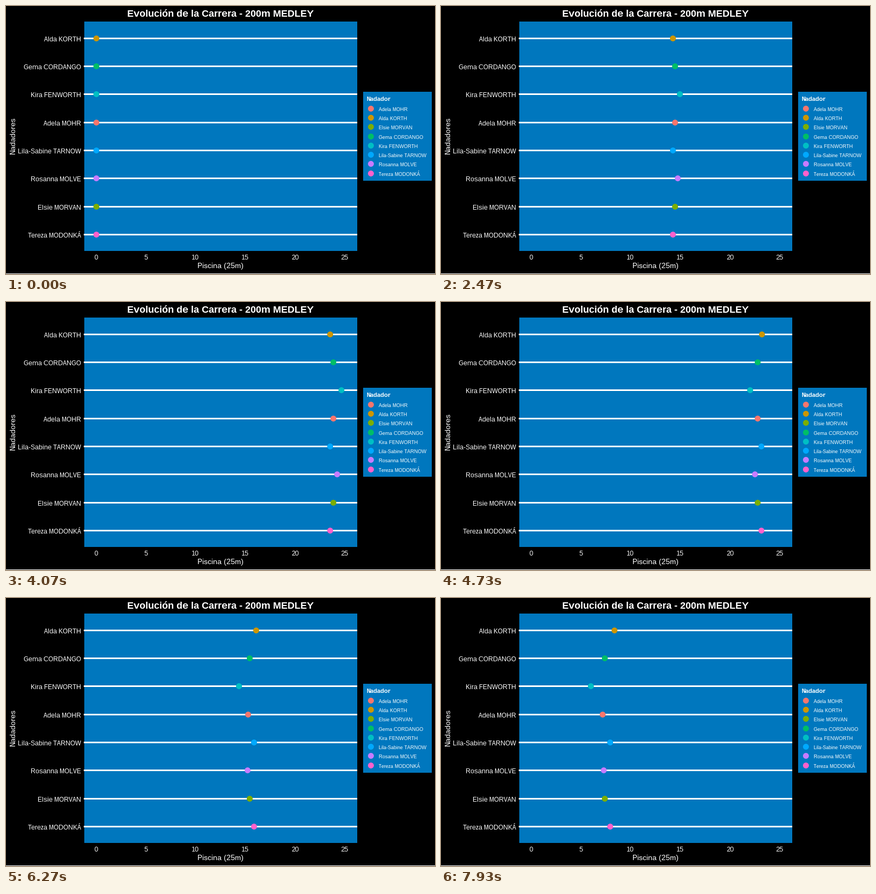
A matplotlib script that plays this animation: 800 px wide and 500 px high, repeating every 8 s.

```python
import math

import matplotlib.pyplot as plt
from matplotlib.animation import FuncAnimation
from matplotlib.patches import Circle, Rectangle

W, H = 800, 500
LOOP_MS, TICK_MS = 8000, 20
POOL = "#0077BE"
LEFT, RIGHT = 168.5, 632.6  # x of 0 m and 25 m
RADIUS = 5.5

# name, colour, steps for the first and second length, in lane order
SWIMMERS = [
    ("Alda KORTH", "#CD9600", 65, 81),
    ("Gema CORDANGO", "#00BE67", 64, 78),
    ("Kira FENWORTH", "#00BFC4", 62, 75),
    ("Adela MOHR", "#F8766D", 64, 77),
    ("Lila-Sabine TARNOW", "#00A9FF", 65, 79),
    ("Rosanna MOLVE", "#C77CFF", 63, 79),
    ("Elsie MORVAN", "#7CAE00", 64, 78),
    ("Tereza MODONKÁ", "#FF61CC", 65, 79),
]

# Fully hinted glyphs on whole pixels
plt.rcParams.update({
    "font.family": "Liberation Sans",
    "text.hinting": "default",
    "text.hinting_factor": 1,
})
fig = plt.figure(figsize=(W / 100, H / 100), dpi=100, facecolor="black")
ax = fig.add_axes([0, 0, 1, 1])
ax.set_xlim(0, W)
ax.set_ylim(H, 0)
ax.axis("off")


def snap(v):
    """Centre of the pixel that holds v."""
    return math.floor(v) + 0.5


def box(x0, y0, x1, y1, color):
    ax.add_patch(Rectangle((x0, y0), x1 - x0, y1 - y0, facecolor=color,
                           linewidth=0, antialiased=False))


def dot(x, y, color):
    return ax.add_patch(Circle((x, y), RADIUS, facecolor=color,
                               linewidth=0, zorder=3))


def label(x, y, text, px, ha="center", **kw):
    ax.text(x, y, text, fontsize=px * 0.72, color="white", ha=ha,
            va="baseline", **kw)


def swim_x(step, out, back):
    if step <= out:
        part = step / out
    else:
        part = 1 - (step - out) / back
    return snap(LEFT + (RIGHT - LEFT) * part)


# Pool, lanes and axis text
box(0, 499, W, H, "white")
box(146, 29, 655, 457, POOL)
label(400, 20, "Evolución de la Carrera - 200m MEDLEY", 18, weight="bold")
label(400, 489, "Piscina (25m)", 14)
label(17, 241, "Nadadores", 14, rotation=90, rotation_mode="anchor")
for i in range(6):
    label(167.7 + 92.8 * i, 473, str(5 * i), 12)

dots = []
for i, (name, color, out, back) in enumerate(SWIMMERS):
    y = snap(60.4 + 52.28 * i)
    box(145, y - 1.5, 655, y + 1.5, "white")
    label(140, y + 5.5, name, 12, ha="right")
    dots.append(dot(snap(LEFT), y, color))

# Legend
box(666, 160, 794, 326, POOL)
label(672, 177, "Nadador", 11, ha="left", weight="bold")
for i, (name, color, *_) in enumerate(sorted(SWIMMERS)):
    y = snap(191.3 + 17.28 * i)
    dot(680.5, y, color)
    label(695, y + 4.5, name, 9, ha="left")


def update(frame):
    step = (3 * frame + 2) // 10  # the dots jump 15 times a second
    for d, (_, _, out, back) in zip(dots, SWIMMERS):
        d.set_center((swim_x(step, out, back), d.center[1]))
    return dots


anim = FuncAnimation(fig, update, frames=LOOP_MS // TICK_MS, interval=TICK_MS,
                     repeat=True, repeat_delay=0)
plt.show()
```
